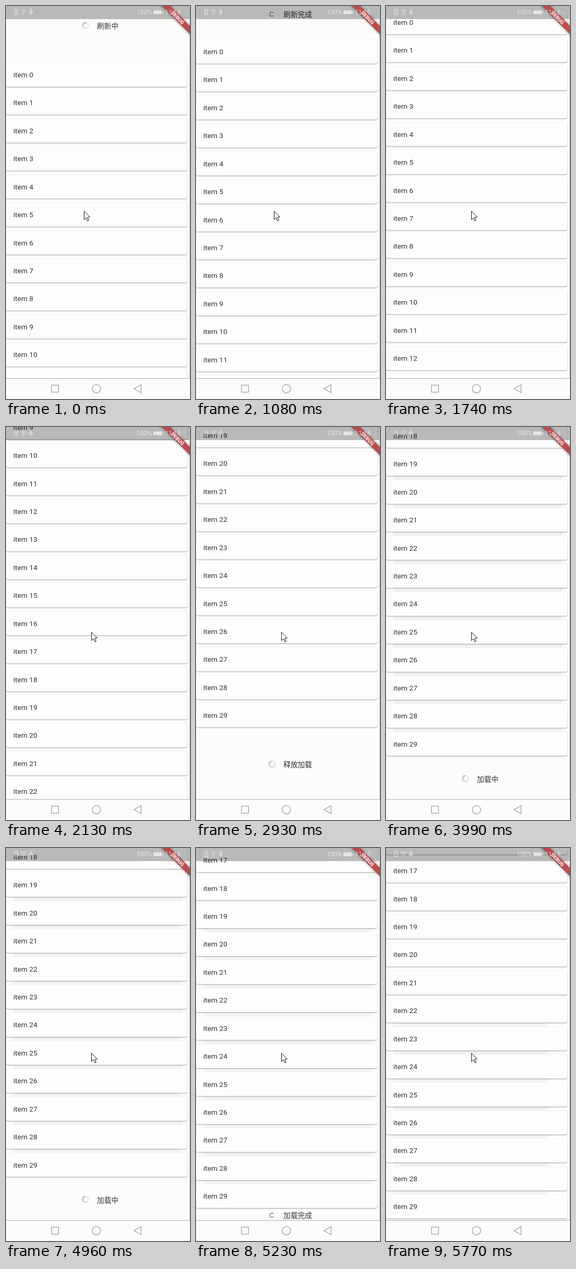
An HTML page with a canvas that plays this animation: 352 px wide and 750 px high, repeating every 6.05 s.

```html
<!DOCTYPE html>
<html lang="zh-CN">
<head>
<meta charset="utf-8">
<title>Pull to refresh</title>
<style>
html, body { margin: 0; width: 100%; height: 100%; overflow: hidden; background: #fcfcfb; }
canvas { display: block; }
</style>
</head>
<body>
<canvas id="stage" width="352" height="750"></canvas>
<script>
const ctx = document.getElementById('stage').getContext('2d');
const LOOP = 6050, PITCH = 53.42, ITEMS = 30, BOTTOM = 711;
const REST_TOP = 55, REST_END = -865;
const INK = '#333', PAPER = '#fcfcfb';
const LATIN = '13.7px Roboto, sans-serif';
const CJK = '13.7px "Noto Sans CJK SC", "Noto Sans CJK", sans-serif';

// [time, centre of the first row]; each position is held until the next one
const scroll = [
  [0, 131], [1080, 87], [1230, 58], [1350, 55],
  [1500, 50], [1620, 42], [1740, 31], [1860, -110],
  [2010, -480], [2140, -770], [2260, REST_END],
  [2810, -925], [2930, -999], [3060, -1006], [3180, -985],
  [3320, -956], [3450, -944.6],
  [5080, -930], [5230, -885], [5350, REST_END]
];
const headerLabels = [[0, '刷新中'], [930, '刷新完成']];
const footerLabels = [[0, '上拉加载'], [2930, '释放加载'], [3320, '加载中'], [5080, '加载完成']];

const held = (steps, t) => steps.reduce((value, [time, next]) => t >= time ? next : value, steps[0][1]);

function text(string, x, y, font, color) {
  ctx.font = font;
  ctx.fillStyle = color;
  ctx.fillText(string, x, y);
}

function polygon(points) {
  ctx.beginPath();
  points.forEach(([x, y]) => ctx.lineTo(x, y));
  ctx.closePath();
}

function arc(x, y, r, from = 0, to = Math.PI * 2) {
  ctx.beginPath();
  ctx.arc(x, y, r, from, to);
  ctx.stroke();
}

function drawSpinner(x, y, t) {
  const head = Math.floor(t / 1000 * 12) % 12;
  ctx.save();
  ctx.translate(x, y);
  ctx.lineWidth = 1.4;
  for (let i = 0; i < 12; i++) {
    const age = (head - i + 12) % 12;
    ctx.strokeStyle = `rgba(90,90,90,${Math.max(0.2, 0.75 - age * 0.08)})`;
    ctx.beginPath();
    ctx.moveTo(0, -4);
    ctx.lineTo(0, -7.3);
    ctx.stroke();
    ctx.rotate(Math.PI / 6);
  }
  ctx.restore();
}

function drawIndicator(label, y, t) {
  const left = 194.6 - label.length * 6.85;
  if (label.endsWith('完成')) {
    ctx.strokeStyle = '#888';
    ctx.lineWidth = 1.6;
    arc(left - 22, y - 0.5, 4, 0.6, 5.6);
  } else {
    drawSpinner(left - 21.6, y - 0.7, t);
  }
  text(label, left, y + 5.2, CJK, INK);
}

function drawGaps(first, t) {
  if (t < 3450) return;
  const settled = t >= 5350;
  ctx.fillStyle = '#f3f3f3';
  for (let i = settled ? 22 : 19; i < ITEMS - 1; i++) {
    ctx.fillRect(14, first + i * PITCH + 23, settled ? 295 : 323, 7.5);
  }
}

function drawList(first) {
  for (let i = 0; i < ITEMS; i++) {
    const y = first + i * PITCH;
    if (y < -40 || y > BOTTOM + 40) continue;
    ctx.save();
    ctx.shadowColor = 'rgba(0,0,0,.38)';
    ctx.shadowBlur = 2;
    ctx.shadowOffsetY = 1;
    ctx.fillStyle = '#fdfdfd';
    ctx.beginPath();
    ctx.roundRect(0, y - 22.5, 347, 45.4, 4);
    ctx.fill();
    ctx.restore();
    text('item ' + i, 14, y + 5, LATIN, INK);
  }
}

function drawBanner() {
  ctx.save();
  ctx.translate(351, 0);
  ctx.rotate(Math.PI / 4);
  ctx.shadowColor = 'rgba(0,0,0,.45)';
  ctx.shadowBlur = 5;
  ctx.fillStyle = '#b94d4d';
  ctx.fillRect(-60, 26.3, 120, 11.2);
  ctx.shadowColor = 'transparent';
  ctx.textAlign = 'center';
  text('DEBUG', 0, 35.3, '900 9.6px Roboto, sans-serif', '#f6eeee');
  ctx.restore();
}

function drawStatus() {
  const white = 'rgba(255,255,255,.65)';
  ctx.strokeStyle = ctx.fillStyle = white;
  ctx.lineWidth = 1;
  ctx.strokeRect(16.5, 6.5, 6, 10);
  ctx.fillRect(19, 9, 1.3, 3);
  ctx.fillRect(19, 13, 1.3, 1.3);
  for (const r of [3, 6, 9]) arc(33.5, 16, r, -2.3, -0.84);
  ctx.fillRect(32.5, 14.5, 2, 2);
  polygon([[47.5, 5], [49.5, 8], [45.5, 8]]);
  ctx.fill();
  ctx.fillRect(47, 7, 1, 10);
  ctx.strokeRect(44.5, 10.5, 6, 3);
  text('100%', 250, 16, '12px Roboto, sans-serif', white);
  ctx.fillRect(282, 8.5, 16, 7);
  ctx.fillRect(299, 10.5, 2, 3);
  text('11:16', 304, 16, '12px Roboto, sans-serif', white);
}

function drawNavigation() {
  ctx.fillStyle = '#fcfcfa';
  ctx.fillRect(0, BOTTOM, 352, 39);
  ctx.fillStyle = '#aaa';
  ctx.fillRect(0, 710.3, 352, 1);
  ctx.strokeStyle = '#999';
  ctx.lineWidth = 1.2;
  ctx.strokeRect(87, 723.5, 13.5, 13.5);
  arc(173, 730.3, 8);
  polygon([[245, 730.3], [258.3, 722.5], [258.3, 738]]);
  ctx.stroke();
}

function drawCursor(x, y) {
  polygon([[0, 0], [0, 16], [3.7, 12.6], [6.4, 18.5], [8.8, 17.5], [6.3, 11.6], [11, 11.3]]
    .map(([dx, dy]) => [x + dx, y + dy]));
  ctx.fillStyle = '#fff';
  ctx.fill();
  ctx.strokeStyle = '#111';
  ctx.lineWidth = 1;
  ctx.stroke();
}

function draw(t) {
  const first = held(scroll, t);
  ctx.fillStyle = PAPER;
  ctx.fillRect(0, 0, 352, 750);

  drawGaps(first, t);
  drawList(first);
  // Indicators stay centred in the space the list leaves open
  if (first > REST_TOP + 5) drawIndicator(held(headerLabels, t), (first - REST_TOP) / 2, t);
  if (first < REST_END) {
    drawIndicator(held(footerLabels, t), (first + ITEMS * PITCH - 26.3 + BOTTOM) / 2, t);
  }

  ctx.fillStyle = 'rgba(0,0,0,.27)';
  ctx.fillRect(0, 0, 352, 25);
  ctx.fillStyle = '#bbb';
  ctx.fillRect(351, 25, 1, BOTTOM - 25);
  drawBanner();
  drawStatus();
  drawNavigation();
  drawCursor(t < 1500 ? 149.5 : 163.5, 391.5);
}

const start = performance.now();
function frame() {
  draw((performance.now() - start) % LOOP);
  requestAnimationFrame(frame);
}
frame();
</script>
</body>
</html>
```
